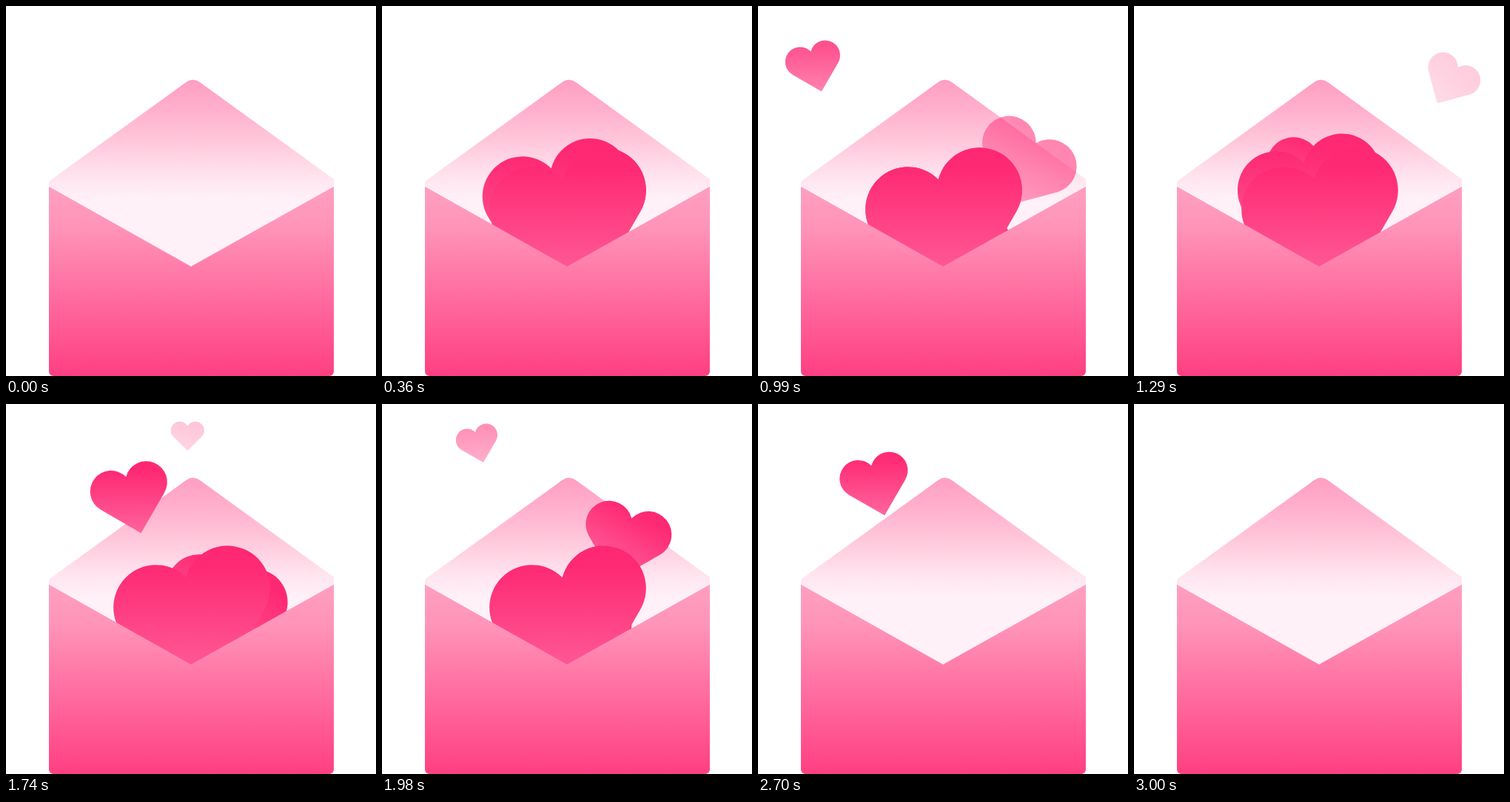
An HTML page with a canvas that plays this animation: 500x500 px, repeating every 3670 ms.

```html
<!DOCTYPE html>
<html lang="en">
<head>
<meta charset="utf-8">
<title>Envelope of hearts</title>
<style>
  html, body { margin: 0; width: 100%; height: 100%; overflow: hidden; background: #fff; }
  canvas { display: block; }
</style>
</head>
<body>
<canvas id="stage" width="500" height="500"></canvas>
<script>
const ctx = document.getElementById('stage').getContext('2d');
const LOOP = 3670, STEP = 30, FLIGHT = 900, RISE = 300, DEPTH = 157;
const R0 = 57.5, R1 = 8.8;

// Unit heart: two circles of radius 1 and a right-angled tip
const heart = new Path2D('M0 2.284L-1.577 .707A1 1 0 1 1 0 -.493A1 1 0 1 1 1.577 .707Z');
const back = new Path2D('M58 237L242 104Q252 96 262 103L443 234V260L250 362 58 260Z');
const front = new Path2D('M58 244L250 352 443 244V494a6 6 0 0 1-6 6H64a6 6 0 0 1-6-6Z');

function verticalGradient(y0, y1, stops) {
  const g = ctx.createLinearGradient(0, y0, 0, y1);
  for (const [at, color] of stops) g.addColorStop(at, color);
  return g;
}
const backFill = verticalGradient(100, 262,
  [[0, '#ff9ec1'], [.25, '#ffb0cc'], [.5, '#ffc6da'], [.82, '#ffe5ef'], [1, '#fff1f7']]);
const frontFill = verticalGradient(244, 500,
  [[0, '#ff9fc0'], [.2, '#ff95b9'], [1, '#ff3f82']]);
const heartFill = verticalGradient(-1.22, 2.21,
  [[0, '#fe2772'], [.15, '#fe2a74'], [1, '#ff649c']]);

const lateFade = t => 1 - Math.max(0, (t - .65) / .35) ** 1.5;
const steadyFade = t => 1 - t;

// Listed back to front; each heart waits in the envelope, then flies off
const hearts = [
  { start: 300,  tilt: -15, from: [251, 262], to: [20, 13] },
  { start: 600,  tilt: 30,  from: [281, 343], to: [479, 15], fade: steadyFade },
  { start: 900,  tilt: 0,   from: [249, 368], to: [245, 12] },
  { start: 1200, tilt: -15, from: [251, 262], to: [109, 12] },
  { start: 1500, tilt: 15,  from: [264, 346], to: [394, 15] },
  { start: 1800, tilt: 0,   from: [249, 367], to: [245, 12] },
  { start: 2100, tilt: -15, from: [251, 262], to: [109, 12] }
];

const mix = (a, b, t) => a + (b - a) * t;
const clamp = t => Math.min(1, Math.max(0, t));
const rad = deg => deg * Math.PI / 180;

function drawHeart({ start, tilt, from, to, fade = lateFade }, time, sink) {
  const t = clamp((time - start) / FLIGHT);
  if (t === 1) return;
  const r = mix(R0, R1, t);
  ctx.save();
  ctx.globalAlpha = fade(t);
  ctx.translate(mix(from[0], to[0], t), mix(from[1], to[1], t) + sink);
  ctx.scale(r, r);
  // The shading is upright on a heart leaning 15 degrees left
  ctx.rotate(rad(tilt + 15));
  const leaning = new Path2D();
  leaning.addPath(heart, new DOMMatrix().rotate(-15));
  ctx.fillStyle = heartFill;
  ctx.fill(leaning);
  ctx.restore();
}

function draw(time) {
  ctx.clearRect(0, 0, 500, 500);
  ctx.fillStyle = backFill;
  ctx.fill(back);
  const sink = DEPTH * (1 - clamp(time / RISE));
  for (const h of hearts) drawHeart(h, time, sink);
  ctx.fillStyle = frontFill;
  ctx.fill(front);
}

const begin = performance.now();
function tick() {
  const time = (performance.now() - begin) % LOOP;
  draw(Math.floor(time / STEP) * STEP);
  requestAnimationFrame(tick);
}
tick();
</script>
</body>
</html>
```
